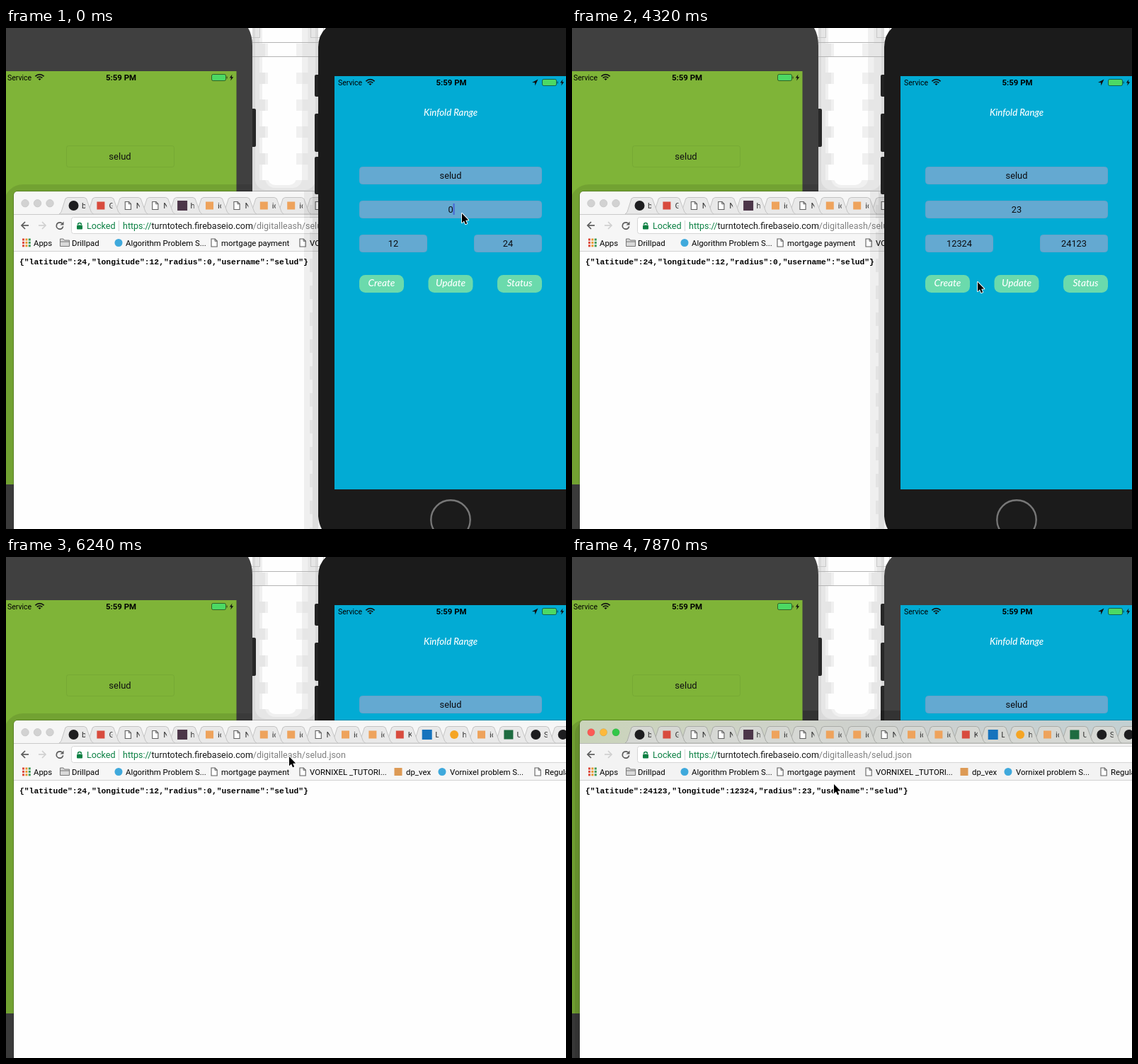
Recreate the animation shown at these times as an HTML page with a canvas. Size 791 by 708 pixels, loop 8 s.

```html
<!DOCTYPE html>
<html lang="en">
<head>
<meta charset="utf-8">
<title>Location form demo</title>
<style>
html, body { margin: 0; width: 100%; height: 100%; overflow: hidden; background: #fefefe; }
canvas { display: block; }
</style>
</head>
<body>
<canvas id="stage" width="791" height="708"></canvas>
<script>
const g = document.getElementById('stage').getContext('2d');
const LOOP = 8000;
const UI = 'Roboto, "Open Sans", sans-serif';
const HAND = 'Lato, "Open Sans", sans-serif';
const MONO = '"Liberation Mono", "DejaVu Sans Mono", monospace';
const USER = 'selud';

// Timelines: [start time, value...]; a value holds until the next entry.
const pointer = [
  [0, 'arrow', 644, 262], [890, 'arrow', 632, 269], [1040, 'arrow', 588, 294],
  [1190, 'arrow', 556, 320], [1330, 'arrow', 555, 310], [3870, 'arrow', 558, 326],
  [4020, 'arrow', 567, 346], [4170, 'arrow', 573, 358], [4320, 'arrow', 573, 359],
  [4460, 'arrow', 560, 362], [4610, 'arrow', 543, 361], [5500, 'arrow', 532, 352],
  [5650, 'arrow', 498, 330], [5790, 'arrow', 450, 302], [5940, 'arrow', 410, 285],
  [6090, 'arrow', 400, 282], [6380, 'beam', 403, 283], [6530, 'beam', 414, 283],
  [6680, 'none', 0, 0], [7720, 'arrow', 493, 248], [7870, 'arrow', 370, 321]
];
const radius = [[0, '0'], [140, ''], [590, '2'], [740, '23']];
const longitude = [[0, '12'], [1930, ''], [2080, '1'], [2230, '12'], [2380, '123'],
  [2530, '1232'], [2670, '12324']];
const latitude = [[0, '24'], [3420, '241'], [3570, '24123']];
const caret = [[0, 'radius'], [1480, 'longitude'], [2970, 'latitude'], [4170, ''],
  [4610, 'latitude'], [5200, ''], [5650, 'latitude'], [6090, '']];
const createAlpha = [[0, 1], [4910, 0.25], [5050, 0.65], [5200, 1]];
const saved = [[0, [24, 12, 0]], [7120, [24123, 12324, 23]]];
const RAISED = 6240, ACTIVE = 6380, LOADED = 6980;

const at = (line, t) => line.filter(k => k[0] <= t).pop();

function rect(x, y, w, h, color) {
  g.fillStyle = color;
  g.fillRect(x, y, w, h);
}
function round(x, y, w, h, r, fill, stroke, width = 1) {
  g.beginPath();
  g.roundRect(x, y, w, h, r);
  paint(fill, stroke, width);
}
function disc(x, y, r, fill, stroke, width) {
  g.beginPath();
  g.arc(x, y, r, 0, 7);
  paint(fill, stroke, width);
}
function shape(points, fill, stroke, width, open) {
  g.beginPath();
  points.forEach(([x, y]) => g.lineTo(x, y));
  if (!open) g.closePath();
  paint(fill, stroke, width);
}
function paint(fill, stroke, width = 1) {
  if (fill) { g.fillStyle = fill; g.fill(); }
  if (stroke) { g.strokeStyle = stroke; g.lineWidth = width; g.stroke(); }
}
function text(s, x, y, font, color = '#000', align = 'left') {
  g.font = font;
  g.textAlign = align;
  g.fillStyle = color;
  g.fillText(s, x, y);
  return g.measureText(s).width;
}
function clipped(x, y, w, h, draw) {
  g.save();
  g.beginPath();
  g.rect(x, y, w, h);
  g.clip();
  draw();
  g.restore();
}

// Banded shadows on the desktop between the two phones
function desktop(phoneActive) {
  rect(0, 0, 791, 708, '#fefefe');
  rect(348, 0, 93, 232, '#dadada');
  const grow = phoneActive ? 9 : 0;
  const bands = [['#e6e6e6', 4, 229], ['#f0f0f0', 10, 226], ['#fefefe', 14, 222]];
  bands.forEach(([color, inset, bottom], n) => {
    for (let i = 0; i < 12; i++) {
      const step = n && i % 2 ? 8 : 0;
      const left = 348 + inset + step;
      const right = 441 - inset - grow * n / 2 - step;
      const y = i * 19 + 3;
      const last = y + 19 >= bottom;
      round(left, i ? y : 0, right - left, last ? bottom - y : 22, last ? [0, 0, 15, 15] : 0, color);
      if (last) break;
    }
  });
  rect(348, 20, 93, 1, '#b4b4b4');
  rect(348, 40, 93, 1, '#b4b4b4');
  g.strokeStyle = '#c8c8c8';
  g.lineWidth = 1;
  g.strokeRect(340.5, -3.5, 18, 17);
  g.strokeRect(430.5, -3.5, 18, 17);
}

function wifi(x, y) {
  g.save();
  g.beginPath();
  g.moveTo(x, y);
  g.arc(x, y, 9.5, -2.4, -0.74);
  g.clip();
  disc(x, y, 2.8, '#111');
  disc(x, y, 5, null, '#111', 1.7);
  disc(x, y, 8.3, null, '#111', 1.7);
  g.restore();
}
function statusBar(x, center, y, battery) {
  text('Service', x, y, '10.5px ' + UI);
  wifi(x + 45.5, y);
  text('5:59 PM', center, y, 'bold 11.4px ' + UI, '#000', 'center');
  round(battery + 0.5, y - 8.5, 20, 9, 2, '#4cd964', 'rgba(0,0,0,.5)');
  rect(battery + 21.5, y - 5.5, 1.3, 3, 'rgba(0,0,0,.5)');
  const b = battery + 28.5;
  shape([[b + 1, y - 8.5], [b - 2.7, y - 3.6], [b - 0.4, y - 3.6], [b - 1.3, y + 0.6],
    [b + 2.7, y - 4.7], [b + 0.2, y - 4.7]], '#111');
}

function leftPhone() {
  round(345, 114, 8, 54, 2, '#272727');
  g.beginPath();
  g.moveTo(0, 0);
  g.lineTo(342, 0);
  g.quadraticCurveTo(348, 10, 348, 25);
  g.lineTo(348, 708);
  g.lineTo(0, 708);
  paint('#404040');
  rect(0, 61, 325.5, 584, '#7fb438');
  statusBar(2, 162.5, 74, 290);
  round(85.5, 166.5, 152, 30, 3, null, '#76a934');
  text(USER, 161, 186, '13px ' + UI, '#111', 'center');
}

function field(name, value, hint, x, y, w, focus) {
  round(x + 0.5, y + 0.5, w - 1, 24, 4, '#64a9d1', '#66a3c9');
  const mid = x + w / 2, font = '12.8px ' + UI;
  const width = text(value || hint, mid, y + 16.5, font, value ? '#0c0c10' : 'rgba(0,0,25,.25)', 'center');
  if (focus === name) rect(mid + (value ? width / 2 : 0), y + 4, 2, 16, '#4766d6');
}
function button(label, x, alpha = 1) {
  round(x, 349, 63, 25, 8.5, '#6bdaac');
  g.globalAlpha = alpha;
  text(label, x + 31.5, 365, 'italic 500 13.7px ' + HAND, '#fff', 'center');
  g.globalAlpha = 1;
}
function rightPhone(t) {
  const dim = t >= ACTIVE;
  for (const [y, h] of [[66, 31], [121, 54], [182, 53]]) round(436, y, 8, h, 2, dim ? '#272727' : '#222');
  g.beginPath();
  g.moveTo(791, 0);
  g.lineTo(452, 0);
  g.quadraticCurveTo(441, 10, 441, 27);
  g.lineTo(441, 690);
  g.quadraticCurveTo(442, 701, 446, 708);
  g.lineTo(791, 708);
  paint(dim ? '#404040' : '#1b1b1b');
  rect(464, 68, 327, 584, '#02abd4');
  statusBar(469, 629, 81, 757);
  shape([[751.5, 72.5], [743, 77], [747, 77.3], [747.4, 81.5]], '#111');
  text('Kinfold Range', 628, 124, 'italic 500 13.2px ' + HAND, '#fff', 'center');

  const focus = at(caret, t)[1];
  field('user', USER, '', 499, 196, 258, focus);
  field('radius', at(radius, t)[1], 'Radius', 499, 244, 258, focus);
  field('longitude', at(longitude, t)[1], 'Longitude', 499, 292, 96, focus);
  field('latitude', at(latitude, t)[1], 'Latitude', 661, 292, 96, focus);
  button('Create', 499, at(createAlpha, t)[1]);
  button('Update', 596.5);
  button('Status', 694);
  disc(628, 695, 27.7, null, '#777', 2.4);
}

function page(x, y) {
  shape([[x - 4, y - 5.5], [x + 1.2, y - 5.5], [x + 4.2, y - 2.5], [x + 4.2, y + 5.5], [x - 4, y + 5.5]],
    '#fff', '#606060', 1.1);
  shape([[x + 1, y - 5.5], [x + 1, y - 2.3], [x + 4.2, y - 2.3]], null, '#606060', 1, true);
}
const square = (x, y, s, color) => rect(x - s / 2, y - s / 2, s, s, color);
const icons = {
  g: (x, y) => disc(x, y, 7, '#1d1d1f'),
  m: (x, y) => square(x, y, 11, '#d84b3e'),
  p: page,
  s: (x, y) => square(x, y, 14, '#4c3649'),
  o: (x, y) => square(x, y, 11, '#eea35c'),
  t: (x, y) => square(x, y, 14, '#1673bd'),
  f: (x, y) => disc(x, y, 6, '#f5a524'),
  w: (x, y) => square(x, y, 13, '#1d6b40')
};
const tabs = 'g:b m:G p:N p:N s:h o:ic p:N o:ic o:ic p:N o:ic o:ic m:K t:L f:h o:ic w:U g:S g:'
  .split(' ').map(s => s.split(':'));

function drawTabs(active) {
  const step = 38.4;
  for (let i = tabs.length - 1; i >= 0; i--) {
    const x = 75 + step * i, [icon, label] = tabs[i];
    shape([[x, 263], [x + 3, 260], [x + 9, 241], [x + 12, 239.5], [x + step - 3, 239.5],
      [x + step, 241], [x + step + 7, 260], [x + step + 10, 263]],
      active ? '#d6d8d4' : '#e9e9e9', active ? '#aaaca8' : '#c4c4c4');
    icons[icon](x + 20.5, 251);
    clipped(x + 30, 240, 7, 22, () => text(label, x + 32, 255, '11.5px ' + UI, '#333'));
  }
}

function bookmarks() {
  const label = (s, x) => text(s, x, 307.5, '11.4px ' + UI);
  const colors = ['#dd4b3e', '#e8962e', '#3f9b58', '#4a84e0'];
  for (let i = 0; i < 9; i++) {
    rect(23 + i % 3 * 4.4, 297.5 + (i / 3 | 0) * 4.4, 3, 3, colors[(i + (i / 3 | 0)) % 4]);
  }
  label('Apps', 39);
  shape([[76.5, 298], [81, 298], [82.5, 300], [89.5, 300], [89.5, 308.5], [76.5, 308.5]], '#d9d9d9', '#777');
  rect(77, 301.5, 12, 1, '#777');
  label('Drillpad', 93);
  disc(159, 303.5, 5.5, '#3fa9dc');
  label('Algorithm Problem S...', 169);
  page(294, 303.5);
  label('mortgage payment', 304);
  page(419, 303.5);
  label('VORNIXEL _TUTORI...', 429);
  square(554, 303.5, 11, '#dd9a55');
  label('dp_vex', 565);
  disc(616, 303.5, 5.5, '#3fa9dc');
  label('Vornixel problem S...', 627);
  page(751, 303.5);
  label('Regular', 761);
}

function arrow(x, y, dir, color) {
  shape([[x - 5 * dir, y], [x + 5 * dir, y]], null, color, 1.7, true);
  shape([[x, y - 5], [x + 5 * dir, y], [x, y + 5]], null, color, 1.7, true);
}
function addressBar(focused) {
  arrow(27, 279, -1, '#5c5c5c');
  arrow(51, 279, 1, '#d0d0d0');
  g.beginPath();
  g.arc(76, 279.5, 4.7, 0.2, 5.4);
  paint(null, '#5c5c5c', 1.7);
  shape([[81.5, 273.5], [81.5, 278.5], [76.5, 278.5]], '#5c5c5c');
  if (focused) round(93, 268, 720, 22, 3, '#fff', '#72abee', 2);
  else round(92.5, 267.5, 720, 23, 3, '#fff', '#d6d6d6');
  round(100, 278.5, 8, 6, 1, '#0b8043');
  g.beginPath();
  g.arc(104, 278, 2.5, Math.PI, 0);
  paint(null, '#0b8043', 1.4);
  text('Locked', 114, 284, '12.6px ' + UI, '#0b8043');
  rect(159, 272, 1, 15, '#d4d4d4');
  if (focused) rect(165, 272, 318, 16, '#b2d3f8');
  let x = 165;
  const parts = [['https://', '#0b8043'], ['turntotech.firebaseio.com', '#181818'],
    ['/digitalleash/' + USER + '.json', focused ? '#6b7d90' : '#808080']];
  for (const [s, color] of parts) x += text(s, x, 284, '12.5px ' + UI, color);
}

function windowShadow(active) {
  clipped(0, 200, 348, 508, () => {
    if (!active) return round(-3, 221, 800, 600, 27, 'rgba(0,0,0,.1)');
    round(-5, 230, 800, 600, 24, 'rgba(0,0,0,.12)');
    round(4, 232, 800, 600, 18, 'rgba(0,0,0,.09)');
  });
  if (active) {
    rect(326, 217, 22, 14, 'rgba(0,0,0,.2)');
    rect(436, 217, 28, 14, 'rgba(0,0,0,.2)');
  }
}
function browser(t) {
  const active = t >= ACTIVE;
  windowShadow(active);
  let bar = '#f6f6f6';
  if (active) {
    bar = g.createLinearGradient(11, 0, 791, 0);
    bar.addColorStop(0, '#cad4ba');
    bar.addColorStop(0.42, '#cfd2cb');
    bar.addColorStop(0.6, '#cdd0cf');
    bar.addColorStop(1, '#c3d0d2');
  }
  round(10.5, 230.5, 800, 500, [6, 0, 0, 0], null, 'rgba(0,0,0,.2)');
  round(11, 231, 800, 500, [5, 0, 0, 0], bar);
  const lights = active ? ['#fc5b55', '#fdb93b', '#33c748'] : ['#d2d2d2', '#d2d2d2', '#d2d2d2'];
  lights.forEach((c, i) => disc(27 + i * 17.5, 247.7, 5.2, c, active ? 'rgba(0,0,0,.1)' : '#c6c6c6', 0.8));
  drawTabs(active);
  rect(11, 263, 780, 53, active ? '#f3f3f3' : '#f6f6f6');
  rect(11, 263, 780, 1, active ? '#b8bab6' : '#cacaca');
  addressBar(active && t < LOADED);
  bookmarks();
  rect(11, 315, 780, 1, '#d2d2d2');
  rect(11, 316, 780, 392, '#fefefe');
  const [lat, lon, rad] = at(saved, t)[1];
  text(`{"latitude":${lat},"longitude":${lon},"radius":${rad},"username":"${USER}"}`,
    19, 333.5, 'bold 11.33px ' + MONO);
}

// Shadow the front phone casts on the browser
function phoneShadow() {
  rect(421, 231, 30, 477, 'rgba(0,0,0,.06)');
  rect(433, 231, 8, 477, 'rgba(0,0,0,.07)');
  for (let y = 250; y < 708; y += 38) rect(429, y, 4, 19, 'rgba(0,0,0,.05)');
}

function drawPointer([, kind, x, y]) {
  g.save();
  g.translate(x, y);
  if (kind === 'arrow') {
    g.lineJoin = 'round';
    const points = [[0, 0], [0, 13.2], [3, 10.4], [5, 15.2], [7.2, 14.3], [5.2, 9.7], [9.2, 9.5]];
    shape(points, '#000', '#fff', 1.8);
    shape(points, '#000');
  } else if (kind === 'beam') {
    shape([[0, -6.5], [0, 6.5]], null, '#222', 1.3, true);
    shape([[-3, -7.5], [0, -6], [3, -7.5]], null, '#222', 1.2, true);
    shape([[-3, 7.5], [0, 6], [3, 7.5]], null, '#222', 1.2, true);
    shape([[-1.8, 2.5], [1.8, 2.5]], null, '#222', 1, true);
  }
  g.restore();
}

function draw(t) {
  desktop(t < ACTIVE);
  leftPhone();
  if (t < RAISED) {
    browser(t);
    phoneShadow();
    rightPhone(t);
  } else {
    rightPhone(t);
    browser(t);
  }
  drawPointer(at(pointer, t));
}

const start = performance.now();
function tick() {
  draw((performance.now() - start) % LOOP);
  requestAnimationFrame(tick);
}
tick();
</script>
</body>
</html>
```
